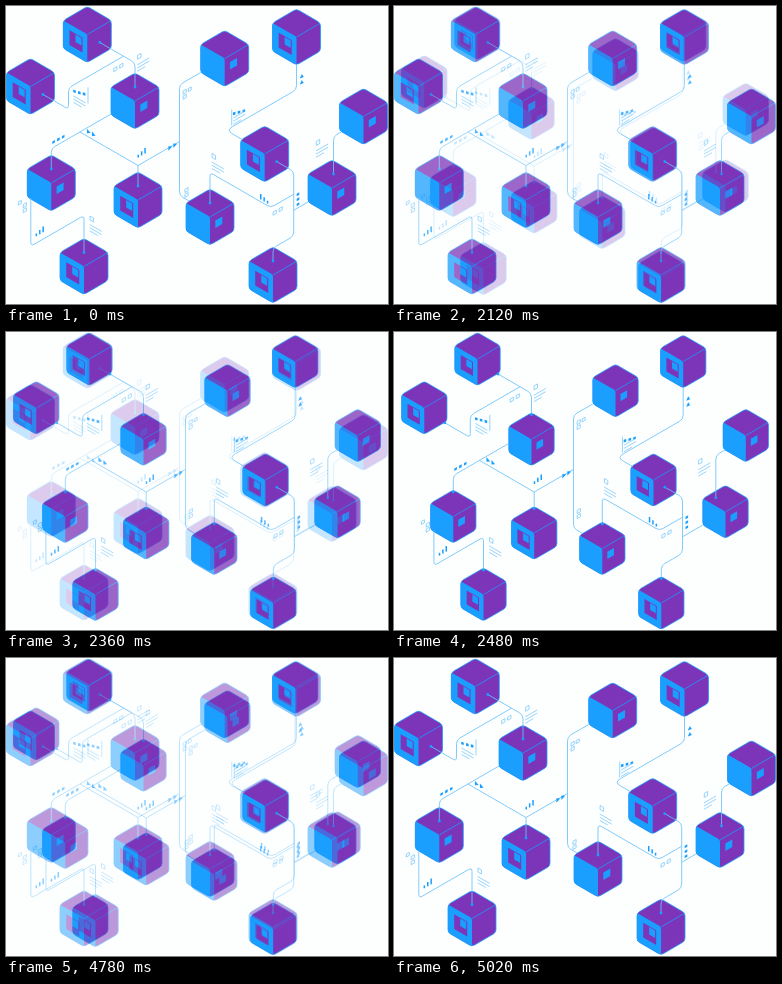
An HTML page that plays this animation: 382x298 px, repeating every 5080 ms.

```html
<!DOCTYPE html>
<html lang="en">
<head>
<meta charset="utf-8">
<title>Connected cubes</title>
<style>
  html, body { margin: 0; width: 100%; height: 100%; overflow: hidden; background: #fdfefe; }
  svg { display: block; width: 382px; height: 298px; }
  .wire { fill: none; stroke: #6cc3fb; stroke-width: .85; }
  .thin { fill: none; stroke: #6cc3fb; stroke-width: .7; }
  .solid { fill: #1a9fff; }
  .purple { fill: #7c34b8; }
  .edge { fill: none; stroke: #1a9fff; stroke-width: .8; }
  .paper { fill: #fdfefe; }
</style>
</head>
<body>
<svg viewBox="0 0 382 298">
  <g id="first"></g>
  <g id="second"></g>
</svg>
<script>
const SLOPE = Math.tan(Math.PI / 6);
const path = (cls, d) => `<path class="${cls}" d="${d}"/>`;
const poly = points => 'M' + points.join('L') + 'Z';
const add = ([x, y], dx, dy) => [x + dx, y + dy];
// Point reached from p by following an isometric axis to column x; dir 1 falls to the right
const follow = (p, x, dir) => [x, p[1] + (x - p[0]) * SLOPE * dir];

function rounded(points, radius, closed) {
  const n = points.length;
  const toward = (a, b) => {
    const length = Math.hypot(b[0] - a[0], b[1] - a[1]) || 1;
    const f = Math.min(radius, length / 2) / length;
    return add(a, (b[0] - a[0]) * f, (b[1] - a[1]) * f);
  };
  const parts = points.map((p, i) => !closed && (i === 0 || i === n - 1)
    ? `${p}`
    : `${toward(p, points[(i + n - 1) % n])}Q${p} ${toward(p, points[(i + 1) % n])}`);
  return 'M' + parts.join('L') + (closed ? 'Z' : '');
}

// Parallelogram with vertical sides
const slab = (x, y, width, height, dir) => {
  const rise = width * SLOPE * dir;
  return [[x, y], [x + width, y + rise], [x + width, y + rise + height], [x, y + height]];
};

const hexagon = [[0, -28], [24, -14], [24, 14], [0, 28], [-24, 14], [-24, -14]];

function cube([x, y], scale, framed) {
  const detail = framed
    ? path('purple', poly(slab(-17.8, -4.3, 13, 14.8, 1))) + path('solid', poly(slab(-11.8, 0, 6, 7.5, 1)))
    : path('solid', poly(slab(5.3, 3.5, 7, 7.6, -1)));
  return `<g transform="translate(${x} ${y}) scale(${scale})">` +
    path('purple', rounded(hexagon, 3, true)) +
    path('solid', rounded(slab(-24, -14, 24, 28, 1), 2, true)) + detail +
    path('edge', rounded(hexagon, 3, true)) + path('edge', 'M0,0L23.5,-13.7') + '</g>';
}

const row = (count, draw) => Array.from({ length: count }, (_, i) => draw(i)).join('');
const tile = (cls, [x, y], size, dir) =>
  path(cls, poly(slab(x - size / 2, y - size / 2 - size * SLOPE * dir / 2, size, size, dir)));

const dots = (p, dir) => row(3, i => tile('solid', add(p, i * 4.8, i * 2.6 * dir), 2.6, dir));
const stack = p => row(3, i => tile('solid', add(p, 0, i * 5), 2.6, -1));
const boxes = (p, dx, dy) => row(2, i => tile('thin', add(p, i * dx, i * dy), 3.2, -1));
const cluster = (p, side) => boxes(p, 0, 5) + tile('thin', add(p, 5 * side, -2.5), 3, -1);
const lines = ([x, y], dir) => row(3, i => {
  const width = i === 2 ? 8 : 12;
  return path('thin', `M${x},${y + i * 3.2}l${width},${width * SLOPE * dir}`);
});
const sheet = (p, dir) =>
  path('thin', poly(slab(p[0] - 1.7, p[1] - 2 - dir, 3.4, 4, dir))) + lines(add(p, -2, dir > 0 ? 5.5 : 8.5), dir);
const panel = (p, dir) => dots(p, dir / 2) + lines(add(p, -1, 4.5), dir) +
  path('thin', `M${p[0] + (dir > 0 ? 13.5 : -2.5)},${p[1] - 4}v16`);
const arrows = (p, dir) => row(2, i => {
  const [x, y] = add(p, i * 5, i * 2.8 * dir);
  return path('solid', poly([[x - 1.7, y - 2.3 - dir], [x + 2, y + dir], [x - 1.7, y + 2.3 - dir]]));
});
const upArrows = ([x, y]) => row(2, i => path('solid', `M${x - 2},${y + i * 6 + 2}l2,-4.6l2,3Z`));
const bars = ([x, y], dir) => row(3, i => {
  const height = 4.2 - (i - 1) * 1.4 * dir;
  return path('solid', `M${x + i * 3.4},${y + i * 2 * dir}v${-height}h1.5v${height}Z`);
});

const FRAMED = 'abegilm';

// Every wire and icon follows from the cube centres and a few docking distances
function scene({ scale, side, top, drop, spots }) {
  const at = (name, dx, dy) => add(spots[name], dx * scale, dy * scale);
  const roof = name => add(spots[name], 0, -top);
  const above = (name, gap) => add(roof(name), 0, -gap);
  const out = name => add(spots[name], ...side);

  const bendC = follow(out('a'), spots.c[0], 1);
  const joinA = follow(bendC, bendC[0] - 11.5, 1);
  const footB = follow(out('b'), out('b')[0] + 25.5, 1);
  const headB = follow(joinA, footB[0], -1);

  const bendH = above('h', drop), bendI = above('i', drop);
  const forkX = (bendH[0] + bendI[0]) / 2 + (bendH[1] - bendI[1]) / (2 * SLOPE);
  const fork = follow(bendH, forkX, -1);

  const trunkX = at('j', -30.5, 0)[0];
  const trunkTop = follow(at('d', -24, 14), trunkX, -1);
  const trunkEnd = at('j', -21, -16);
  const trunkFoot = follow(trunkEnd, trunkX, 1);
  const trunkJoin = follow(bendI, trunkX, -1);

  const kneeG = at('g', -35.5, -22);
  const kneeTop = add(kneeG, 0, -3.5);
  const bendF = follow(at('f', -22, 15.3), spots.f[0] - 30, -1);

  const poleTop = follow(at('g', 12, 7.6), spots.g[0] + 29, 1);
  const pole = poleTop[0];
  const bendM = above('m', 13);
  const bendJ = above('j', drop + 10);
  const valley = follow(bendJ, pole - 23, 1);
  const poleJoin = follow(valley, pole, -1);

  const bendL = above('l', drop + 16.5);
  const startH = at('h', -20.5, 15);
  const footH = follow(bendL, startH[0], -1);

  const wires = [
    [out('a'), bendC, roof('c')],
    [out('b'), footB, headB, joinA],
    [follow(bendH, at('c', -24, 0)[0], -1), bendH, roof('h')],
    [fork, bendI], [bendI, roof('i')], [bendI, trunkJoin],
    [at('d', -24, 14), trunkTop, trunkFoot, trunkEnd],
    [at('e', 0, 28), follow(kneeTop, spots.e[0], -1), kneeTop, kneeG, follow(kneeG, kneeG[0] + 13, 1)],
    [at('f', -22, 15.3), bendF, [bendF[0], spots.k[1] - 14]],
    [at('g', 12, 7.6), poleTop, follow(bendM, pole, -1), bendM, roof('m')],
    [roof('j'), bendJ, valley, poleJoin],
    [at('k', -24, 14), follow(at('k', -24, 14), pole, -1)],
    [startH, footH, bendL, roof('l')]
  ];
  const ends = [out('a'), out('b'), at('g', 12, 7.6), [bendF[0], spots.k[1] - 14],
    ...[...'chijlm'].map(roof)];

  return '<rect class="paper" width="382" height="298"/>' +
    Object.keys(spots).map(name => cube(spots[name], scale, FRAMED.includes(name))).join('') +
    wires.map(points => path('wire', rounded(points, 4))).join('') +
    ends.map(([x, y]) => `<circle class="solid" cx="${x}" cy="${y}" r="1.4"/>`).join('') +
    sheet(add(bendC, 4.3, -6.5), -1) + boxes(add(joinA, -8.2, 13), 6, -3.5) +
    panel(add(headB, 6, 3.5), 1) + panel(add(kneeG, 5, -18.5), -1) +
    dots(add(bendH, 2.3, -6.5), -1) + arrows(add(fork, 8.7, 0), 1) +
    bars(add(bendI, -.5, -8), -1) + arrows(add(trunkJoin, -9.4, 6), -1) +
    cluster(add(trunkTop, 5.2, 7), 1) + boxes(add(roof('j'), -23.5, -13), 0, 5) +
    upArrows(at('e', 5.3, 39.5)) + sheet(add(bendF, -15.5, 6), -1) +
    sheet(add(bendJ, 3.8, -16), 1) + bars(add(valley, -10.7, -8), 1) +
    boxes(add(valley, 4, 5.2), 6, -3.5) + stack(add(poleJoin, 4.3, 0)) +
    cluster(add(footH, -6, -41), -1) + bars(add(footH, 4.8, -10), -1) +
    sheet(add(bendL, 7.7, 3.5), 1);
}

const wide = {
  scale: 1, side: [12.5, 8], top: 14, drop: 20.5,
  spots: {
    a: [81.3, 28.5], b: [24.5, 80.5], c: [129, 95], d: [218.7, 52.5], e: [290.5, 31],
    f: [357.5, 110.5], g: [258.7, 148], h: [45.3, 177], i: [132, 194], j: [204, 211],
    k: [326, 182], l: [78, 260.5], m: [267, 269]
  }
};
const narrow = {
  scale: .945, side: [20.5, 15], top: 24.5, drop: 16.5,
  spots: {
    a: [83.5, 27], b: [30.3, 75.8], c: [137.5, 107.3], d: [221.5, 58.7], e: [289.2, 29.5],
    f: [351.8, 103.5], g: [259.5, 148], h: [59.3, 184.5], i: [140.2, 201], j: [208.3, 216.5],
    k: [331.5, 179.8], l: [89.5, 262.5], m: [267.3, 271]
  }
};

document.getElementById('first').innerHTML = scene(wide);
const overlay = document.getElementById('second');
overlay.innerHTML = scene(narrow);

const LOOP = 5080, STEP = 60, FADE_STEPS = 8, FADE_IN = 2060, FADE_OUT = 4600;
const fade = (time, start) =>
  Math.max(0, Math.min(FADE_STEPS, Math.floor((time - start) / STEP) + 1)) / FADE_STEPS;

function draw() {
  const time = performance.now() % LOOP;
  overlay.setAttribute('opacity', fade(time, FADE_IN) - fade(time, FADE_OUT));
  requestAnimationFrame(draw);
}
draw();
</script>
</body>
</html>
```
